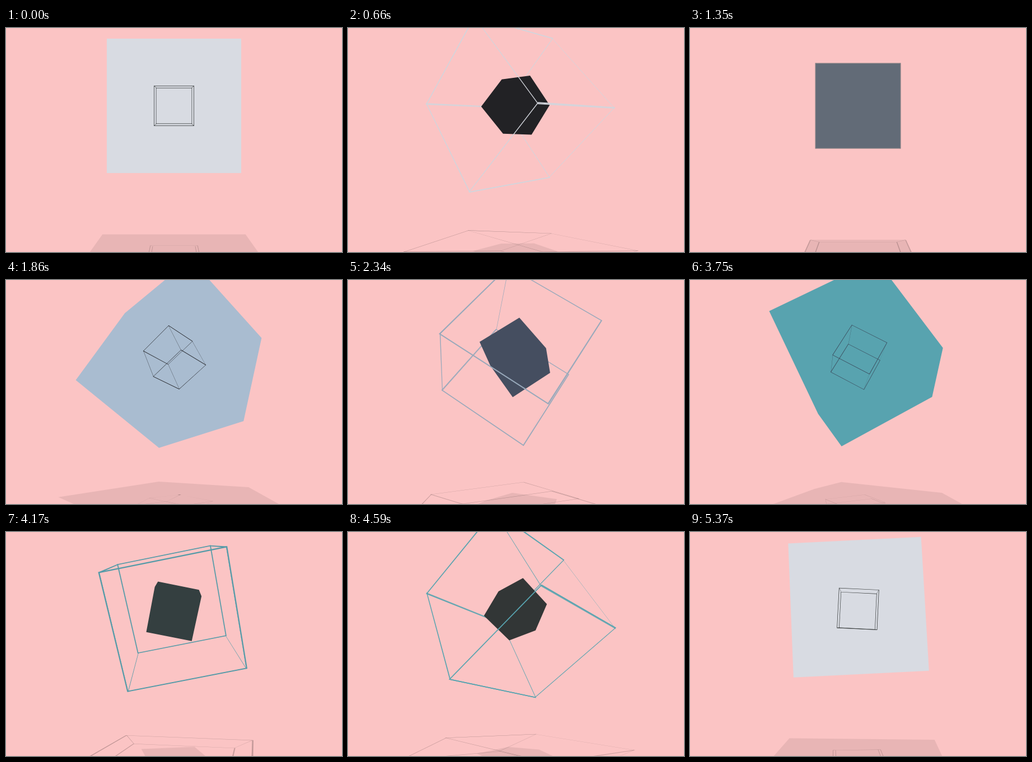
An HTML page with a canvas for the animation above (5.4 s loop, 600 by 400 pixels).

```html
<!DOCTYPE html>
<html lang="en">
<head>
<meta charset="utf-8">
<title>Swapping cubes</title>
<style>
  html, body { margin: 0; width: 100%; height: 100%; overflow: hidden; background: #fbc4c4; }
  canvas { display: block; width: 600px; height: 400px; }
</style>
</head>
<body>
<canvas id="stage" width="600" height="400"></canvas>
<script>
const ctx = document.getElementById('stage').getContext('2d');
const LOOP = 5400, STEP = 30, PHASES = 6;
const CENTER = [300, 139], DEPTH = 600;
const LARGE = 100, SMALL = 100 / 3;
const BORDER = 0.02;

// One colour per phase; even phases start large, odd ones small.
const COLORS = [
  [216, 219, 226], [27, 27, 30], [169, 188, 208],
  [55, 63, 81], [88, 164, 176], [49, 53, 53]
];
const CORNERS = [[-1, -1], [1, -1], [1, 1], [-1, 1]];

const mix = (a, b, k) => a + (b - a) * k;

// cubic-bezier(.975, 0, .025, 1), solved by bisection
function ease(x) {
  let lo = 0, hi = 1;
  for (let i = 0; i < 30; i++) {
    const t = (lo + hi) / 2, e = t - 0.5;
    if (0.5 + 0.0375 * e + 3.85 * e * e * e < x) lo = t; else hi = t;
  }
  return lo * lo * (3 - 2 * lo);
}

function stateAt(phase) {
  const i = Math.floor(phase) % PHASES, k = ease(phase % 1);
  const next = COLORS[(i + 1) % PHASES];
  const rgb = COLORS[i].map((v, c) => Math.round(mix(v, next[c], k)));
  return {
    size: i % 2 ? mix(SMALL, LARGE, k) : mix(LARGE, SMALL, k),
    color: `rgb(${rgb})`
  };
}

// Rotation about the axis (-1, 0, side)
function rotate([x, y, z], angle, side) {
  const c = Math.cos(angle), s = Math.sin(angle) / Math.SQRT2;
  const d = (1 - c) * (side * z - x) / 2;
  return [
    c * x - d - s * side * y,
    c * y + s * (side * x + z),
    c * z + d * side - s * y
  ];
}

function project([x, y, z]) {
  const k = DEPTH / (DEPTH - z);
  return [x * k, y * k];
}

function area(q) {
  return q.reduce((sum, p, i) => {
    const n = q[(i + 1) % q.length];
    return sum + p[0] * n[1] - n[0] * p[1];
  }, 0);
}

// Faces across the given axes: the quad, the outer edge of its border, its facing
function cube(size, angle, side, axes) {
  const faces = [];
  for (const axis of axes) {
    for (const sign of [-1, 1]) {
      const square = extent => CORNERS.map(([u, v]) => {
        const p = [0, 0, 0];
        p[axis] = sign * size;
        p[(axis + 1) % 3] = u * size * extent;
        p[(axis + 2) % 3] = v * size * extent;
        return project(rotate(p, angle, side));
      });
      const quad = square(1);
      faces.push({ quad, rim: square(1 + BORDER), front: area(quad) * sign > 0 });
    }
  }
  return faces;
}

const onScreen = ([x, y]) => [CENTER[0] + x, CENTER[1] + y];

// The picture laid down on the floor, bottom edge farthest away
function onFloor([x, y]) {
  const w = 0.804 + 0.00113 * y;
  return [CENTER[0] + x / w, CENTER[1] + (208.8 + 0.057 * y) / w];
}

function trace(quad, place) {
  quad.forEach((p, i) => {
    const [x, y] = place(p);
    if (i) ctx.lineTo(x, y); else ctx.moveTo(x, y);
  });
  ctx.closePath();
}

function drawSolid(faces, color, place) {
  ctx.fillStyle = color;
  ctx.beginPath();
  for (const f of faces) {
    if (!f.front) continue;
    trace(area(f.quad) > 0 ? f.quad : [...f.quad].reverse(), place);
  }
  ctx.fill();
}

function drawWire(faces, color, place) {
  ctx.fillStyle = color;
  for (const f of faces) {
    ctx.beginPath();
    trace(f.rim, place);
    trace(f.quad, place);
    ctx.fill('evenodd');
  }
}

function draw(time) {
  const phase = time / LOOP * PHASES, angle = time / LOOP * 4 * Math.PI;
  const solid = stateAt(phase), wire = stateAt(phase + PHASES - 1);
  const solidFaces = cube(solid.size, angle, 1, [0, 1, 2]);
  // The wire cube is open at the top and bottom
  const wireFaces = cube(wire.size, angle, -1, [0, 2]);

  ctx.fillStyle = '#fbc4c4';
  ctx.fillRect(0, 0, 600, 400);

  drawSolid(solidFaces, 'rgba(0,0,0,.075)', onFloor);
  drawWire(wireFaces, 'rgba(0,0,0,.2)', onFloor);

  const outside = wire.size > solid.size - 0.01;
  if (outside) drawWire(wireFaces.filter(f => !f.front), wire.color, onScreen);
  drawSolid(solidFaces, solid.color, onScreen);
  drawWire(outside ? wireFaces.filter(f => f.front) : wireFaces, wire.color, onScreen);
}

const start = performance.now();
function frame() {
  const t = (performance.now() - start) % LOOP;
  draw(Math.floor(t / STEP) * STEP);
  requestAnimationFrame(frame);
}
frame();
</script>
</body>
</html>
```
